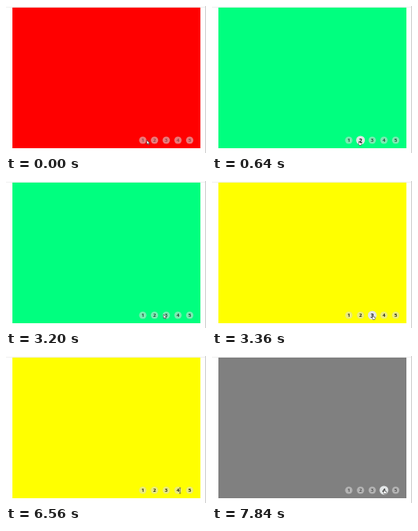
These frames come from a looping animation (250x184 px, 8 s). An HTML page:

```html
<!DOCTYPE html>
<html lang="en">
<head>
<meta charset="utf-8">
<title>Colour switcher</title>
<style>
  html, body { margin: 0; width: 100%; height: 100%; overflow: hidden; background: #fff; }
  svg { display: block; width: 250px; height: 184px; }

  .panel, .digits, .on, .cursor, .shape { animation: 8s step-end infinite; }
  .panel { animation-name: panel; }
  .digits { animation-name: digits; }
  .cursor { animation-name: move; }
  .dot { fill: #ddd; opacity: .55; }
  .digits { fill: #222; }
  text { font: bold 6px "Open Sans", "DejaVu Sans", sans-serif; text-anchor: middle; }
  .on { visibility: hidden; }
  .on circle { fill: #e2e5e6; }
  .on text { font-size: 7px; fill: #111; }
  .on2 { animation-name: on2; }
  .on3 { animation-name: on3; }
  .on4 { animation-name: on4; }
  .shape { fill: #fff; stroke: #333; stroke-width: .6; stroke-linejoin: round; visibility: hidden; }
  .arrow { animation-name: arrow; }
  .hand { animation-name: hand; }
  .beam { animation-name: beam; fill: none; }

  @keyframes panel {
    0% { fill: #f00; }
    8% { fill: #00ff7f; }
    42% { fill: #ff0; }
    84%, 100% { fill: #808080; }
  }
  @keyframes digits {
    0% { opacity: .5; }
    8% { opacity: .85; }
    42% { opacity: 1; }
    84%, 100% { opacity: .7; }
  }
  @keyframes on2 { 8% { visibility: visible; } 36%, 100% { visibility: hidden; } }
  @keyframes on3 { 42% { visibility: visible; } 70%, 100% { visibility: hidden; } }
  @keyframes on4 { 84%, 100% { visibility: visible; } }

  @keyframes move {
    0% { transform: translate(176px, 168px); }
    4% { transform: translate(180px, 168px); }
    6% { transform: translate(183px, 169px); }
    8% { transform: translate(183px, 169px); }
    32% { transform: translate(187px, 168px); }
    36% { transform: translate(194px, 167px); }
    38% { transform: translate(197px, 167px); }
    40% { transform: translate(197px, 167px); }
    42% { transform: translate(200px, 168px); }
    44% { transform: translate(202px, 167px); }
    46% { transform: translate(201.5px, 167.5px); }
    68% { transform: translate(207px, 165px); }
    70% { transform: translate(212px, 164px); }
    72% { transform: translate(213px, 165px); }
    74% { transform: translate(216px, 162px); }
    82% { transform: translate(216px, 165px); }
    84%, 100% { transform: translate(214px, 167px); }
  }
  @keyframes arrow {
    0% { visibility: visible; }
    6% { visibility: hidden; }
    36% { visibility: visible; }
    42% { visibility: hidden; }
    44% { visibility: visible; }
    74%, 100% { visibility: hidden; }
  }
  @keyframes hand {
    6% { visibility: visible; }
    36% { visibility: hidden; }
    42% { visibility: visible; }
    44% { visibility: hidden; }
    84%, 100% { visibility: visible; }
  }
  @keyframes beam { 74% { visibility: visible; } 84%, 100% { visibility: hidden; } }
</style>
</head>
<body>
<svg viewBox="0 0 250 184">
  <path d="M0 1.5H249" stroke="#f0f0f0"/>
  <path d="M249.5 0V184" stroke="#ccc"/>
  <rect class="panel" x="8" y="2" width="235" height="176"/>
  <g id="dots"></g>
  <g class="digits" id="digits"></g>
  <g id="active"></g>
  <g class="cursor">
    <path class="shape arrow" d="M0 0V5L1.2 4 2 5.7 3 5.2 2.2 3.7H3.8Z"/>
    <path class="shape hand" d="M1 0Q1.7 0 1.7 .7V2L4 2.5V4.2L3.3 5.5H1.2L0 3.5 .6 3V.5Z"/>
    <path class="shape beam" d="M.5 0H2.5M1.5 0V7M.5 7H2.5"/>
  </g>
</svg>
<script>
  const NS = "http://www.w3.org/2000/svg";
  const Y = 168;

  function add(parent, tag, attrs, label = "") {
    const el = document.createElementNS(NS, tag);
    for (const key in attrs) el.setAttribute(key, attrs[key]);
    el.textContent = label;
    return parent.appendChild(el);
  }

  const [dots, digits, active] =
    ["dots", "digits", "active"].map(id => document.getElementById(id));

  for (let n = 1; n <= 5; n++) {
    const x = 171 + (n - 1) * 14.65;
    add(dots, "circle", { class: "dot", cx: x, cy: Y, r: 4.6 });
    add(digits, "text", { x, y: Y + 2.2 }, n);
    if (n > 1 && n < 5) {
      const on = add(active, "g", { class: "on on" + n });
      add(on, "circle", { cx: x, cy: Y, r: 5.5 });
      add(on, "text", { x, y: Y + 2.5 }, n);
    }
  }
</script>
</body>
</html>
```
